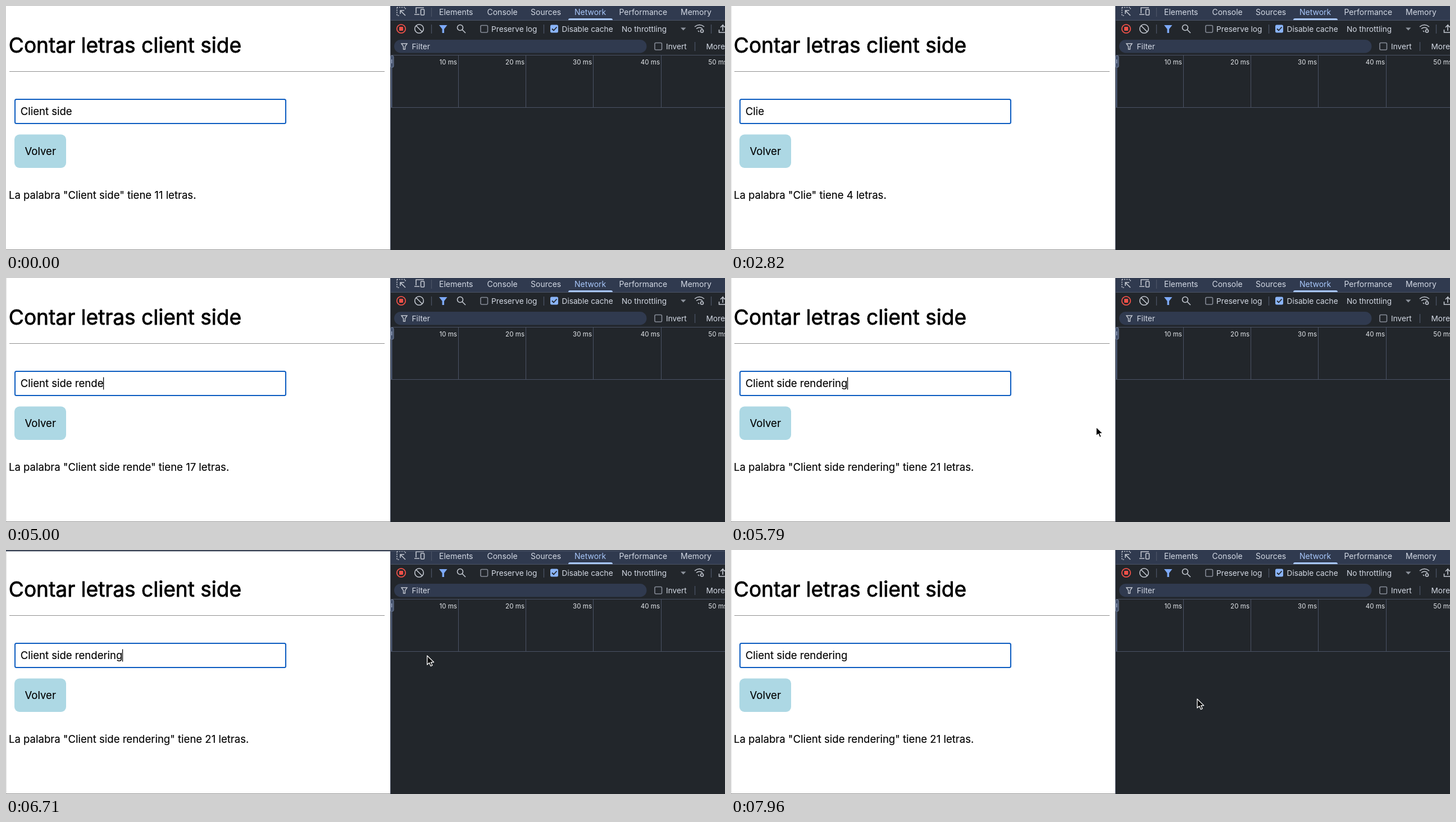
An HTML page that plays this animation: 1280x434 px, repeating every 8 s.

```html
<!DOCTYPE html>
<html lang="es">
<head>
<meta charset="utf-8">
<title>Contar letras</title>
<style>
html, body { margin: 0; width: 100%; height: 100%; overflow: hidden; background: #fff; }
svg { display: block; width: 100%; height: 100%; }
text { font-family: Inter, "Open Sans", sans-serif; white-space: pre; }
.page { font-size: 18.54px; fill: #000; }
.page text { stroke: #000; stroke-width: .15; }
.page .title { font-size: 37.1px; stroke-width: .8; }
.tabs { font-size: 14px; fill: #d3d9e4; }
.tools { font-size: 13.7px; fill: #d3d9e4; }
.scale { font-size: 11.6px; fill: #e3e6ea; text-anchor: end; }
.marks { font-size: 13.8px; fill: #d5dae3; }
.line { fill: none; stroke: #c3c8d1; stroke-width: 1.6; }
.rule { stroke: #4b5365; }
</style>
</head>
<body>
<svg viewBox="0 0 1280 434">
  <g class="page">
    <text class="title" x="4.800" y="83">Contar letras client side</text>
    <path d="M6 116.500H674" stroke="#8f8f8f"/>
    <rect x="16" y="166" width="482" height="43" rx="2.500" fill="#fff" stroke="#0b5bc0" stroke-width="2"/>
    <rect id="selection" x="26" y="176" height="23" fill="#b3d7ff"/>
    <text id="field" x="25.700" y="194"></text>
    <rect id="caret" y="176.500" width="1.300" height="22"/>
    <rect x="15" y="228.500" width="92" height="59.500" rx="9" fill="#add8e4"/>
    <text x="33.500" y="265">Volver</text>
    <text id="result" x="5" y="343"></text>
  </g>
  <rect id="edge" width="1" fill="#e2e2e2"/>
  <path d="M0 433.500H684" stroke="#909090"/>

  <rect x="684" width="596" height="434" fill="#22262b"/>
  <rect x="684" width="596" height="25" fill="#303a4f"/>
  <path class="rule" d="M684 25.500H1280M684 87.500H1280M684 180.500H1280M684.500 0V434M805.500 88V180M925.500 88V180M1045.500 88V180M1166.500 88V180"/>
  <path class="rule" d="M757.500 3V19M757.500 33V49M957.500 33V49M1255.500 33V49M1226.500 64V80" stroke-width="1.300"/>
  <rect x="691" y="60" width="449.500" height="23.500" rx="11.700" fill="#303a4f"/>
  <path d="M686.500 109V180" stroke="#65769a" stroke-width="1.500"/>
  <rect x="684.500" y="88.500" width="5.500" height="20.500" rx="2" fill="#46536d" stroke="#75839f"/>
  <path d="M686.700 95V102" stroke="#c5d2ec"/>

  <g class="tabs" id="tabs"></g>
  <path d="M1001 25Q1001 22 1004 22H1077Q1080 22 1080 25Z" fill="#a8c7fa"/>
  <g class="tools" id="tools"></g>
  <g class="scale" id="scale"></g>

  <g class="line">
    <path d="M696 2.500H711V7M696 2.500V17H701" stroke-dasharray="2 2"/>
    <path d="M702 8L711 17M702 14V8H709"/>
    <path d="M730 13V3H744M727 15H736"/>
    <rect x="738.500" y="6" width="6" height="10" rx="1"/>
    <circle cx="735.500" cy="40.500" r="7.800"/>
    <path d="M730 35L741 46"/>
    <circle cx="808.500" cy="38.500" r="5"/>
    <path d="M812 42L818 48"/>
    <path d="M704 67H714L710.500 72V77H707.500V72Z" stroke-width="1.400"/>
    <rect x="845" y="34.500" width="12.500" height="12.500" rx="2" stroke="#858b96"/>
    <rect x="1155" y="65.500" width="12.500" height="12.500" rx="2" stroke="#858b96"/>
    <path d="M1226 37Q1234.500 30 1243 37M1229 40.500Q1234.500 36 1240 40.500M1232 44L1234 46"/>
    <circle cx="1239" cy="44.500" r="2.500"/>
    <path d="M1269.500 42V47H1280M1276 44V34L1272 38M1276 34L1280 38"/>
  </g>
  <circle cx="703.500" cy="40.500" r="7.700" fill="none" stroke="#ee5148" stroke-width="1.800"/>
  <rect x="700" y="37" width="7" height="7" rx="1" fill="#ee5148"/>
  <path d="M771 34H785.500L780 41V48H776.500V41Z" fill="#7da9f7"/>
  <rect x="969" y="33.500" width="14" height="14" rx="2.500" fill="#8ab4f8"/>
  <path d="M972 40.500L975 43.500L980.500 37.500" fill="none" stroke="#22262b" stroke-width="1.800"/>
  <path d="M1201 38.500H1210.500L1205.800 43.500Z" fill="#8d939d"/>

  <g id="bar">
    <rect y="-70" width="1280" height="88" fill="#14202c"/>
    <rect y="18" width="1280" height="48.500" fill="#2d3648"/>
    <path d="M0 66.500H1280" stroke="#4c5568"/>
    <g class="line"><path d="M19 38.500H25V44H19ZM28.500 38.500H34.500V44H28.500ZM19 47.500H25V53H19ZM28.500 47.500H34.500V53H28.500Z"/></g>
    <g class="marks" id="marks"></g>
  </g>

  <g id="mouse" stroke-linejoin="round">
    <path id="arrow" d="M-1 -1V15L2.800 11.600L5.400 17.500L8.200 16.200L5.600 10.600H10.800Z" fill="#000" stroke="#fff" stroke-width="1.300"/>
    <g id="beam" fill="none">
      <path d="M-4 -9Q0 -9 0 -6Q0 -9 4 -9M0 -6V6M-4 9Q0 9 0 6Q0 9 4 9M-2.500 3H2.500" stroke="#fff" stroke-width="3.800"/>
      <path d="M-4 -9Q0 -9 0 -6Q0 -9 4 -9M0 -6V6M-4 9Q0 9 0 6Q0 9 4 9M-2.500 3H2.500" stroke="#000" stroke-width="1.500"/>
    </g>
  </g>
</svg>
<script>
const $ = id => document.getElementById(id);
const show = (id, on) => { $(id).style.display = on ? "" : "none"; };

function add(parent, tag, attrs, label = "") {
  const el = document.createElementNS($(parent).namespaceURI, tag);
  for (const key in attrs) el.setAttribute(key, attrs[key]);
  el.textContent = label;
  $(parent).append(el);
}

const labels = (parent, y, list) =>
  list.forEach(([x, label, fill]) => add(parent, "text", fill ? { x, y, fill } : { x, y }, label));

labels("tabs", 16, [[771, "Elements"], [856.5, "Console"], [934, "Sources"],
  [1012, "Network", "#a8c7fa"], [1091.5, "Performance"], [1201, "Memory"]]);
labels("tools", 46, [[864, "Preserve log"], [989.5, "Disable cache"], [1096, "No throttling"]]);
labels("tools", 77, [[722.5, "Filter"], [1175, "Invert"], [1246.5, "More filters"]]);
labels("scale", 104, [[803, "10 ms"], [923, "20 ms"], [1043, "30 ms"], [1164, "40 ms"], [1284, "50 ms"]]);
labels("marks", 50.5, [[95, "Screen Recorder -..."], [273, "Animated GIF edit..."],
  [450.5, "Online Syntax high..."], [627.5, "Ejemplos en Angul..."], [806, "opciones"],
  [910, "The Central Repos..."], [1087, "2018 - Angular 6 -..."], [1264.5, "Introducción"]]);

// Bookmark icons, then the row of tab icons above them
[[79, "#4f9bd8", 9], [258, "#8c949e", 0], [434.5, "#e5473d", 0], [612, "#ee8130", 9], [790, "#fff", 9],
  [894, "#4a55b8", 8], [1071, "#4a86ee", 0], [1249, "#4a86ee", 0]].forEach(([x, fill, rx]) =>
  add("marks", "rect", { x: x - 9, y: 36.5, width: 18, height: 18, rx, fill }));
const green = "#2fa84f", blue = "#4a7fe0", white = "#e4e7ea";
["#ee5c54", green, green, blue, blue, green, green, green, "#efb26b", "#7d8794", green, "#554bb5",
  white, "#ee8130", white, green, white, green, white, blue, "#e5473d"].forEach((fill, i) =>
  add("marks", "circle", { cx: i < 3 ? [18, 65, 97][i] : 168 + (i - 3) * 63.4, cy: -2.5, r: 7, fill }));

// "" restarts the caret, "*" selects all, "!" clears, "<" deletes one letter
const keys = [[460, ""], [960, ""], [1640, "*"], [1860, "!"],
  [2460, "C"], [2570, "l"], [2680, "i"], [2800, "e"], [2900, "n"], [3000, "t"], [3110, " "], [3210, "s"],
  [3390, "i"], [3470, "d"], [3550, "e"], [4210, "r"], [4340, "<"], [4410, " "], [4500, "r"], [4580, "e"],
  [4750, "n"], [4840, "d"], [4930, "e"], [5020, "r"], [5110, "i"], [5210, "n"], [5320, "g"]];

function typed(t) {
  let word = "Client side", last = -1, selected = false;
  for (const [time, key] of keys) {
    if (time > t) break;
    last = time;
    selected = key === "*";
    if (key === "!") word = "";
    else if (key === "<") word = word.slice(0, -1);
    else if (!selected) word += key;
  }
  const age = t - last;
  return { word, selected, caret: last > 0 && !selected && age >= 40 && age % 1000 < 500 };
}

function at(track, t) {
  const i = track.findIndex(k => k[0] > t);
  if (i < 0) return track[track.length - 1].slice(1);
  if (i === 0) return track[0].slice(1);
  const a = track[i - 1], b = track[i], p = (t - a[0]) / (b[0] - a[0]);
  return a.slice(1).map((v, n) => v + (b[n + 1] - v) * p);
}

const path = [[250, 237, 362], [290, 237, 330], [430, 234, 322], [610, 215, 245], [750, 215, 245],
  [1140, 186, 190], [5640, 186, 190], [5750, 560, 250], [5790, 650, 266], [5860, 728, 266],
  [6000, 728, 266], [6080, 700, 240], [6260, 695, 4], [6400, 700, 20], [6540, 720, 111], [6790, 765, 225],
  [6950, 795, 268], [7080, 798, 230], [7250, 800, 79], [7450, 806, 60], [7640, 810, 60], [7780, 824, 190], [7930, 831, 266]];
const barDrop = [[6260, -2], [6450, 84], [6480, 84], [6540, 66], [6720, -2]];
const within = (t, spans) => spans.some(([a, b]) => t >= a && t < b);

function draw(t) {
  const { word, selected, caret } = typed(t);
  $("field").textContent = word;
  $("result").textContent = word && `La palabra "${word}" tiene ${word.length} letras.`;
  const width = word ? $("field").getComputedTextLength() : 0;
  show("selection", selected);
  $("selection").setAttribute("width", width);
  show("caret", caret);
  $("caret").setAttribute("x", 25.2 + width);
  $("edge").setAttribute("height", t < 750 ? 0 : t < 1640 ? 308 : 434);

  const drop = at(barDrop, t)[0];
  show("bar", drop > 0);
  $("bar").setAttribute("transform", `translate(0 ${drop - 66})`);

  const [x, y] = at(path, t);
  const beam = within(t, [[250, 480], [960, 1860], [5640, 5690], [6500, 6600]]);
  show("mouse", within(t, [[250, 1860], [5640, 8000]]));
  show("beam", beam);
  show("arrow", !beam);
  $("mouse").setAttribute("transform", `translate(${x} ${y})`);
}

function tick() {
  draw(performance.now() % 8000);
  requestAnimationFrame(tick);
}
tick();
</script>
</body>
</html>
```
